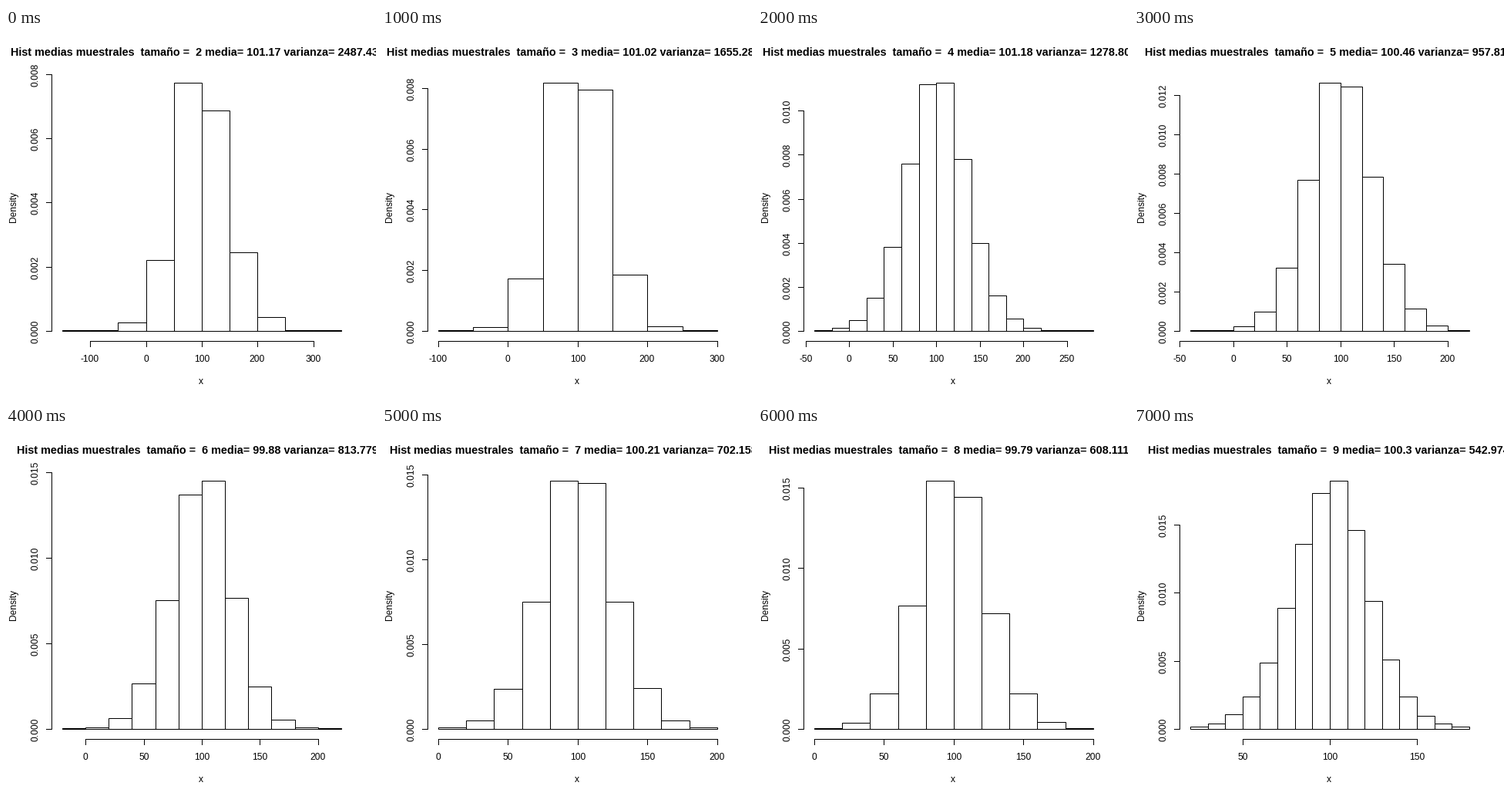
Animation, 480 px wide and 480 px high, one loop 8 s. Source, as a matplotlib script:

```python
import math

import matplotlib.pyplot as plt
import numpy as np
from matplotlib.animation import FuncAnimation
from matplotlib.patches import Rectangle

SIZE = 480
LEFT, WIDTH = 73.5, 361.8      # span of the bars
BASE, HEIGHT = 393.69, 321.8   # baseline and tallest bar
AXIS_X, AXIS_Y = 59.5, 406.5
TICK = 7
DRAWS = 1000                   # sample means per histogram

plt.rcParams["font.family"] = "Liberation Sans"

# mean, variance, range, then median and the spread below and above it
SAMPLES = [
    ("101.17", "2487.4306", (-150, 350), (98.9, 25.64, 29.8)),
    ("101.02", "1655.2817", (-100, 300), (99.8, 22.8, 23.8)),
    ("101.18", "1278.8042", (-40, 280), (100.55, 20.8, 20.95)),
    ("100.46", "957.813", (-40, 220), (100.25, 18.15, 18.6)),
    ("99.88", "813.7794", (-20, 220), (100.4, 16.3, 15.4)),
    ("100.21", "702.1584", (0, 200), (100, 15.2, 15.3)),
    ("99.79", "608.1114", (0, 200), (99.15, 14.4, 15.1)),
    ("100.3", "542.974", (20, 180), (100.65, 13.8, 13.2)),
]

# At 72 dpi one point is one pixel
fig = plt.figure(figsize=(SIZE / 72, SIZE / 72), dpi=72, facecolor="white")
ax = fig.add_axes([0, 0, 1, 1])


def pixel(v):
    return math.floor(v) + 0.5


def line(xs, ys):
    ax.plot(xs, ys, color="black", lw=1, snap=False,
            solid_capstyle="projecting")


def label(x, y, text, rotation=0):
    ax.text(x, y, text, fontsize=12, ha="center", va="baseline",
            rotation=rotation, rotation_mode="anchor")


def bin_width(span):
    return 50 if span >= 400 else 20 if span >= 200 else 10


def ticks(lo, hi, step):
    """Multiples of step within the range widened by 4% on each side."""
    pad = 0.04 * (hi - lo)
    first = math.ceil((lo - pad) / step)
    last = math.floor((hi + pad) / step)
    return [k * step for k in range(first, last + 1)]


def bell_density(edges, median, below, above):
    """Bin densities of a two-sided, slightly light-tailed logistic curve."""
    t = (edges - median) / np.where(edges < median, below, above)
    share = 1 / (1 + np.exp(-(t + 0.008 * t ** 3)))
    share[0], share[-1] = 0, 1
    counts = np.maximum(1, np.rint(DRAWS * np.diff(share)))
    return counts / (DRAWS * np.diff(edges))


def draw(i):
    mean, var, (lo, hi), shape = SAMPLES[i]
    step = bin_width(hi - lo)
    edges = np.arange(lo, hi + step, step)
    density = bell_density(edges, *shape)
    top = density.max()

    def px(v):
        return pixel(LEFT + WIDTH * (v - lo) / (hi - lo))

    def py(d):
        return pixel(BASE - HEIGHT * d / top)

    ax.clear()
    ax.set_xlim(0, SIZE)
    ax.set_ylim(SIZE, 0)
    ax.axis("off")

    for a, b, d in zip(edges, edges[1:], density):
        ax.add_patch(Rectangle((px(a), py(d)), px(b) - px(a), py(0) - py(d),
                               fc="none", ec="black", lw=1, snap=False))

    x_ticks = ticks(lo, hi, 100 if hi - lo > 350 else 50)
    line([px(x_ticks[0]), px(x_ticks[-1])], [AXIS_Y, AXIS_Y])
    for v in x_ticks:
        line([px(v)] * 2, [AXIS_Y, AXIS_Y + TICK])
        label(px(v) - 0.7, 433, str(v))

    y_ticks = ticks(0, top, 0.005 if top > 0.013 else 0.002)
    line([AXIS_X, AXIS_X], [py(0), py(y_ticks[-1])])
    for d in y_ticks:
        line([AXIS_X - TICK, AXIS_X], [py(d)] * 2)
        label(41, py(d), f"{d:.3f}", rotation=90)

    # Shorter numbers shift the centred title by half a digit each
    start = 6 + 4 * (15 - len(mean) - len(var))
    ax.text(start, 36, f"Hist medias muestrales  tamaño =  {i + 2} "
            f"media= {mean} varianza= {var}",
            fontsize=14.4, weight="bold", va="baseline")
    label(253.3, 462, "x")
    label(13, 232.5, "Density", rotation=90)
    return []


anim = FuncAnimation(fig, draw, frames=len(SAMPLES), interval=1000,
                     init_func=lambda: draw(0), repeat=True, repeat_delay=0)
plt.show()
```
